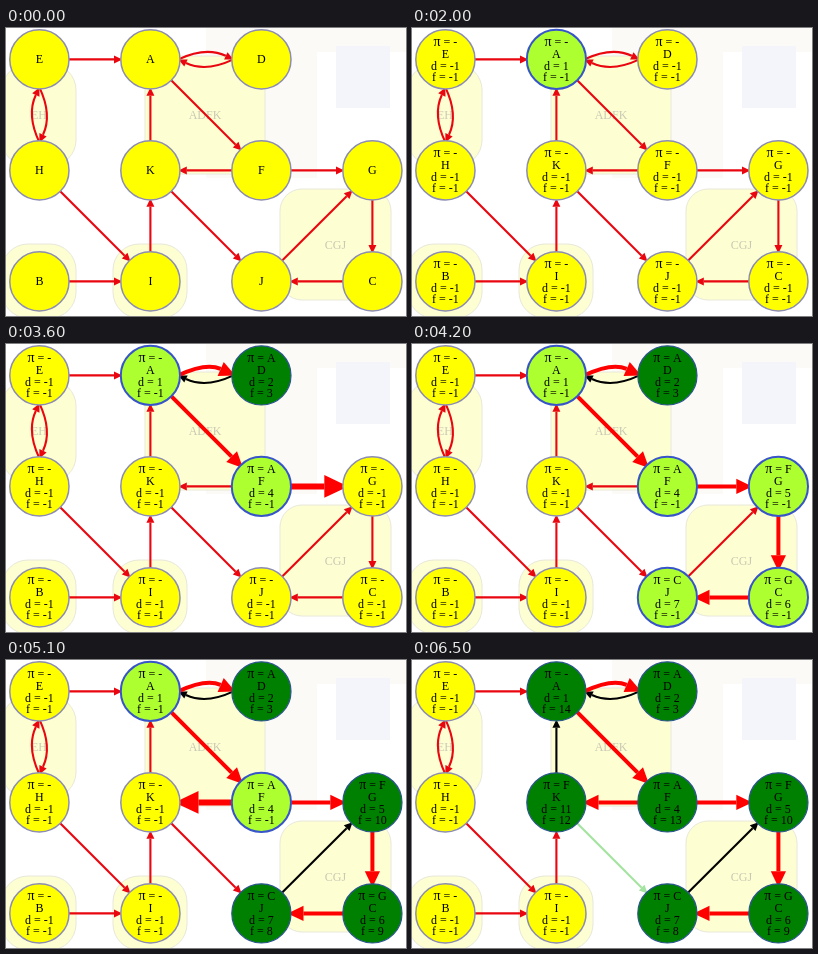
An HTML page for the animation above (6.6 s loop, 400 by 288 pixels).

```html
<!DOCTYPE html>
<html lang="en">
<head>
<meta charset="utf-8">
<title>Depth-first search</title>
<style>
  html, body { margin: 0; width: 100%; height: 100%; overflow: hidden; background: #fff; }
  svg { display: block; width: 400px; height: 288px; }
  text { font: 12px "Liberation Serif", "Times New Roman", serif; text-anchor: middle; }
</style>
</head>
<body>
<svg id="stage" viewBox="0 0 400 288"></svg>
<script>
const LOOP = 6600, TICK = 100, R = 29.6;
const INIT = 800, FIRST_VISIT = 1600, SEARCH = 2620, BEAT = 77;
const RED = '#e9060f';

// Column and row of each vertex
const grid = { E: [0, 0], A: [1, 0], D: [2, 0], H: [0, 1], K: [1, 1], F: [2, 1],
               G: [3, 1], B: [0, 2], I: [1, 2], J: [2, 2], C: [3, 2] };
const edgeNames = 'EA DA AD EH HE AF KA FK FG HI KJ IK BI JG GC CJ'.split(' ');

// Two letters explore an edge, = keeps it in the tree;
// + visits, - finishes, ! marks a back edge, ? a cross edge
const script = ('AD +D =AD DA !DA -D AF +F =AF FG +G =FG GC +C =GC CJ +J =CJ ' +
                'JG !JG -J -C -G FK +K =FK KA !KA KJ ?KJ -K -F -A').split(' ');

const steps = [{ at: FIRST_VISIT, op: '+A' }];
let at = SEARCH;
for (const op of script) {
  steps.push({ at: at += BEAT, op });
  if (op[0] === '-') at += 2 * BEAT; // backtracking takes longer
}

const svg = document.getElementById('stage');
function add(parent, tag, attrs, text) {
  const el = document.createElementNS('http://www.w3.org/2000/svg', tag);
  set(el, attrs);
  if (text) el.textContent = text;
  parent.appendChild(el);
  return el;
}
function set(el, attrs) {
  for (const key in attrs) el.setAttribute(key, attrs[key]);
}
const center = v => ({ x: 33.4 + 111 * grid[v][0], y: 31.4 + 111 * grid[v][1] });

// Pale tints and component boxes behind the graph
function tint(x, y, width, height, fill) {
  add(svg, 'rect', { x, y, width, height, fill });
}
function group(x, y, width, height, rx, label) {
  add(svg, 'rect', { x, y, width, height, rx, fill: '#fefed3', stroke: '#e8e8da' });
  if (label) add(svg, 'text', { x: x + width / 2, y: y + height / 2 + 4, fill: '#c9c9b4' }, label);
}
tint(200, 0, 111, 150, '#fcfaf7');
tint(311, 0, 89, 24, '#fcfaf7');
tint(330, 18, 54, 62, '#f4f5fb');
group(-4, 36, 74, 102, 26, 'EH');
group(139, 28, 120, 118, 6, 'ADFK');
group(274, 161, 111, 111, 22, 'CGJ');
group(-4, 216, 74, 74, 26);
group(107, 216, 74, 74, 26);

const edges = {}, nodes = {};
for (const name of edgeNames) {
  edges[name] = { line: add(svg, 'path', { fill: 'none' }), head: add(svg, 'path', {}) };
}
for (const v in grid) {
  const { x, y } = center(v);
  const disc = add(svg, 'circle', { cx: x, cy: y, r: R });
  const plain = add(svg, 'text', { x, y: y + 4 }, v);
  const full = add(svg, 'g', {});
  const pi = add(full, 'text', { x, y: y - 13.6 });
  add(pi, 'tspan', { 'font-size': 14 }, 'π');
  const parent = add(pi, 'tspan', {});
  add(full, 'text', { x, y: y - 1.6 }, v);
  const d = add(full, 'text', { x, y: y + 10.2 });
  const f = add(full, 'text', { x, y: y + 21.6 });
  nodes[v] = { disc, plain, full, parent, d, f };
}

const widths = { thin: 2.1, tree: 4, bold: 6 };

// Arrowheads scale with the line and tuck under the vertex they point at
function drawEdge(name, { weight, color }) {
  const width = widths[weight], length = 4 * width, half = 1.9 * width;
  const a = center(name[0]), b = center(name[1]);
  const dist = Math.hypot(b.x - a.x, b.y - a.y);
  const ux = (b.x - a.x) / dist, uy = (b.y - a.y) / dist;
  const bend = edges[name[1] + name[0]] ? 13 : 0;
  const inset = R + 0.5 - width;
  const start = { x: a.x + ux * 28, y: a.y + uy * 28 };
  const tip = { x: b.x - ux * inset, y: b.y - uy * inset };
  const mid = { x: (a.x + b.x) / 2 + uy * bend, y: (a.y + b.y) / 2 - ux * bend };
  const reach = Math.hypot(tip.x - mid.x, tip.y - mid.y);
  const tx = (tip.x - mid.x) / reach, ty = (tip.y - mid.y) / reach;
  const base = { x: tip.x - tx * length, y: tip.y - ty * length };
  const { line, head } = edges[name];
  const p = (x, y) => x.toFixed(2) + ' ' + y.toFixed(2);
  const route = bend ? `Q${p(mid.x, mid.y)} ` : 'L';
  set(line, { d: `M${p(start.x, start.y)}${route}${p(base.x, base.y)}`,
              stroke: color, 'stroke-width': width });
  set(head, { d: `M${p(tip.x, tip.y)}L${p(base.x - ty * half, base.y + tx * half)}` +
                 `L${p(base.x + ty * half, base.y - tx * half)}Z`, fill: color });
}

const looks = {
  fresh: { fill: '#ffff00', stroke: '#8c8cb4', 'stroke-width': 1.5 },
  open: { fill: '#adff2f', stroke: '#3755c8', 'stroke-width': 2 },
  done: { fill: '#008000', stroke: '#2c5590', 'stroke-width': 1.2 }
};

function drawNode(v, state, labelled) {
  const n = nodes[v];
  set(n.disc, looks[state.look]);
  set(n.plain, { visibility: labelled ? 'hidden' : 'visible' });
  set(n.full, { visibility: labelled ? 'visible' : 'hidden' });
  n.parent.textContent = ' = ' + state.parent;
  n.d.textContent = 'd = ' + state.d;
  n.f.textContent = 'f = ' + state.f;
}

function stateAt(t) {
  const vs = {}, es = {};
  for (const v in grid) vs[v] = { look: 'fresh', parent: '-', d: -1, f: -1 };
  for (const e of edgeNames) es[e] = { weight: 'thin', color: RED };
  let clock = 0, active = null;
  for (const { at, op } of steps) {
    if (at > t) break;
    const target = op.slice(1);
    switch (op[0]) {
      case '+':
        Object.assign(vs[target], { look: 'open', d: ++clock });
        if (active) vs[target].parent = active[0];
        break;
      case '-': Object.assign(vs[target], { look: 'done', f: ++clock }); break;
      case '=': es[target].weight = 'tree'; break;
      case '!': es[target] = { weight: 'thin', color: '#000' }; break;
      case '?': es[target] = { weight: 'thin', color: '#a4e3a0' }; break;
      default:
        active = op;
        es[op] = { weight: 'bold', color: '#ff0000' };
    }
  }
  return { vs, es };
}

function render(t) {
  const { vs, es } = stateAt(t);
  for (const e in es) drawEdge(e, es[e]);
  for (const v in vs) drawNode(v, vs[v], t >= INIT);
}

let shown = -1;
const origin = performance.now();
function frame() {
  const t = Math.floor((performance.now() - origin) % LOOP / TICK) * TICK;
  if (t !== shown) render(shown = t);
  requestAnimationFrame(frame);
}
frame();
</script>
</body>
</html>
```
